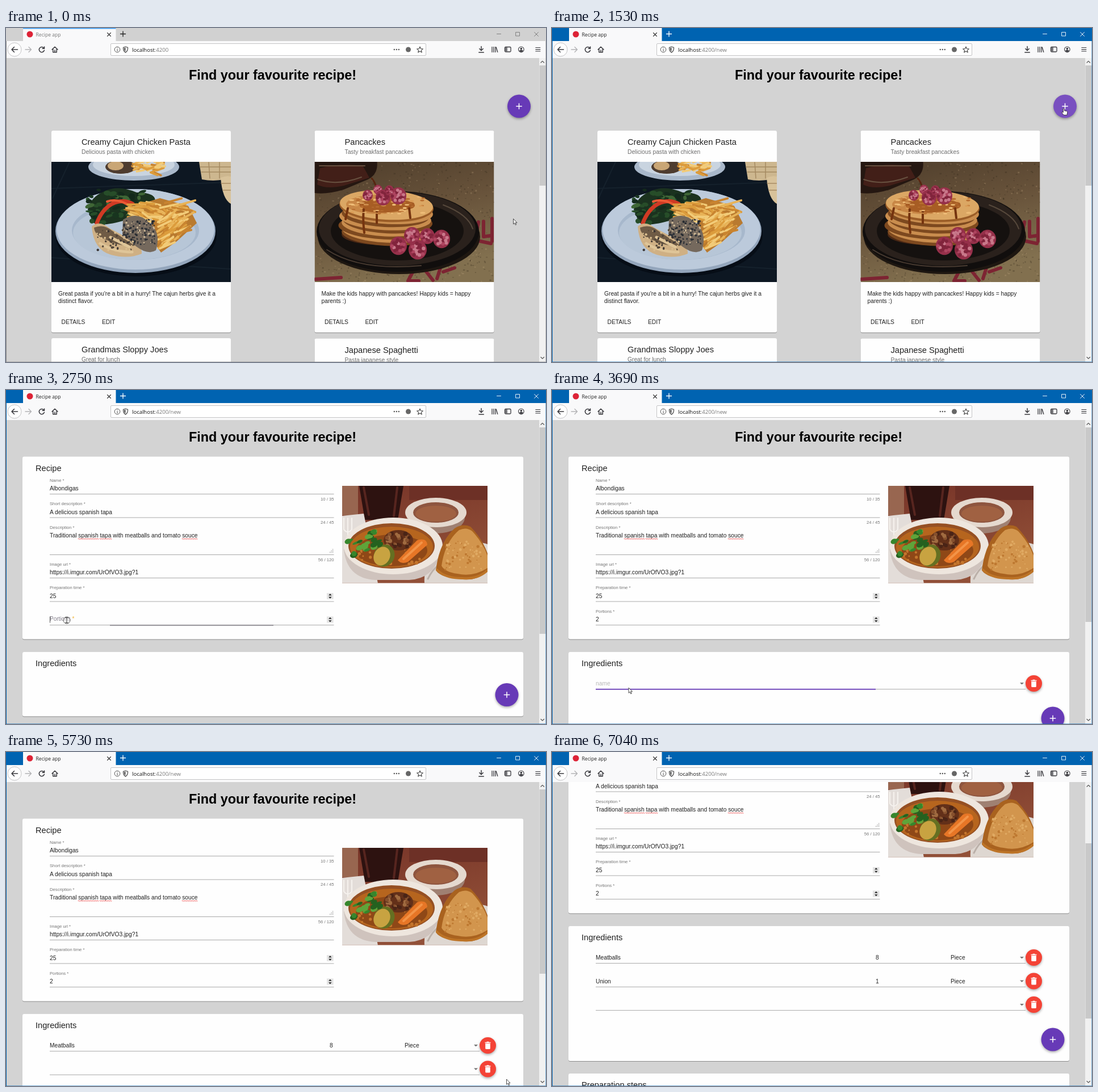
An HTML page that plays this animation: 951 by 589 pixels, repeating every 8 s.

```html
<!DOCTYPE html>
<html lang="en">
<head>
<meta charset="utf-8">
<title>Recipe app</title>
<style>
html, body { margin: 0; width: 100%; height: 100%; overflow: hidden; background: #d3d3d3; }
svg { display: block; width: 951px; height: 589px; font: 10.25px "Liberation Sans", Arial, sans-serif; }
.ui { font-family: "Open Sans", "Noto Sans", sans-serif; }
.card { fill: #fefefe; filter: drop-shadow(0 1px 0.6px #0005); }
.fab { filter: drop-shadow(0 2.5px 2px #0005); }
.menu { fill: #fff; filter: drop-shadow(0 2px 3px #0005); }
.line { fill: none; stroke-linecap: round; stroke-linejoin: round; }
</style>
</head>
<body>
<svg id="stage" viewBox="0 0 951 589"></svg>
<script>
const LOOP = 8000, PURPLE = '#673ab7', INK = '#212121', SOFT = '#757575', AMBER = '#f0b030';

// Each step changes the state left by the one before it.
const STEPS = [
  { at: 0, view: 'home', thumb: [66, 278], cur: ['arrow', 893, 336] },
  { at: 430, cur: ['arrow', 895, 178] },
  { at: 850, cur: ['hand', 897.5, 141] },
  { at: 1530, active: true, path: '/new', hover: true },
  { at: 1930, view: 'form', hover: false, focus: 'url', thumb: [66, 430], cur: ['beam', 89.5, 361.5] },
  { at: 2340, focus: 'prep' },
  { at: 2750, focus: 'portionsStart', prep: '25', photo: true, cur: ['press', 107, 406] },
  { at: 3170, focus: 'portions', portions: '2', cur: ['arrow', 570, 566] },
  { at: 3690, focus: 'name', thumb: [66, 409], rows: [['', '', '']], cur: ['arrow', 134.5, 524.5] },
  { at: 4370, focus: 'qty', rows: [['Meatballs', '8', '']], cur: ['arrow', 694.5, 522] },
  { at: 4790, focus: 'unit', menu: true, cur: ['hand', 722, 516] },
  { at: 5190, focus: '', menu: false, rows: [['Meatballs', '8', 'Piece']], cur: ['hand', 876, 575] },
  { at: 5730, thumb: [66, 391], rows: [['Meatballs', '8', 'Piece'], ['', '', '']], cur: ['arrow', 881, 576.5] },
  { at: 6650, thumb: [161, 470], scroll: 155, hover: true, cur: ['arrow', 882, 534.5],
    rows: [['Meatballs', '8', 'Piece'], ['Union', '1', 'Piece'], ['', '', '']] },
  { at: 7040, hover: false, cur: null }
];
let last = { rows: [], path: '', prep: '', portions: '', scroll: 0 };
const states = STEPS.map(s => last = { ...last, ...s });

// Drawing helpers
const rect = (x, y, w, h, fill, more = '') => `<rect x="${x}" y="${y}" width="${w}" height="${h}" fill="${fill}" ${more}/>`;
const oval = (x, y, rx, ry, fill, more = '') => `<ellipse cx="${x}" cy="${y}" rx="${rx}" ry="${ry}" fill="${fill}" ${more}/>`;
const dot = (x, y, r, fill, more) => oval(x, y, r, r, fill, more);
const shape = (d, fill, more = '') => `<path d="${d}" fill="${fill}" ${more}/>`;
const line = (d, color, w = 1) => `<path class="line" d="${d}" stroke="${color}" stroke-width="${w}"/>`;
const rule = (x1, x2, y, color = '#949494', w = 0.8) => rect(x1, y - w / 2, x2 - x1, w, color);
const text = (x, y, s, size = 10.25, fill = INK, more = '') =>
  `<text x="${x}" y="${y}" font-size="${size}" fill="${fill}" ${more}>${s}</text>`;
const group = (s, attrs) => `<g ${attrs}>${s}</g>`;
const turn = (a, x, y) => `transform="rotate(${a} ${x} ${y})"`;
const many = (n, fn) => Array.from({ length: n }, (_, i) => fn(i)).join('');
function seeded(seed) {
  return (lo, hi) => lo + (hi - lo) * ((seed = seed * 16807 % 2147483647) / 2147483647);
}
const pick = (r, list) => list[Math.floor(r(0, list.length))];

// Photographs as flat shapes
function pastaPhoto() {
  const r = seeded(41);
  const fry = (x, y, len, a) => line(`M${x} ${y}l${len * Math.cos(a)} ${len * Math.sin(a)}`,
    pick(r, ['#e8b358', '#dc9c3c', '#f2cb78', '#c98430']), 3.8);
  return rect(80, 236, 316, 212, '#0d1722')
    + line('M80 283L396 272M80 405L396 425M112 236L82 300', '#15212c', 2)
    + shape('M340 236h56v28q-25 8-51 3Z', '#cdb78f') + line('M342 245h54M344 254h52M357 237l2 28M376 237v28', '#a58a62', 1.5)
    + shape('M378 264q10-4 18-2v48q-15-8-18-46Z', '#d8c29a') + line('M379 274h17M382 286h14', '#a88c64', 1.5)
    + oval(225, 245, 80, 24, '#a9b8ca') + oval(225, 241, 72, 20, '#c9d4e0')
    + oval(202, 245, 27, 12, '#4e3c2f') + oval(193, 243, 14, 8, '#c9a676')
    + many(30, () => fry(r(222, 268), r(236, 255), 13, r(-0.7, 0.5)))
    + oval(229, 366, 142, 72, '#060d16') + oval(228, 358, 141, 74, '#94a6bc')
    + oval(228, 355, 139, 71, '#bccadb') + oval(228, 357, 112, 52, '#a7b8cc') + oval(226, 361, 108, 48, '#b7c6d7')
    + shape('M144 320q5-22 29-32q25-12 57 2q37 0 32 18l-49 30q-46 14-60 5Z', '#1b321f')
    + many(60, () => oval(r(145, 250), r(289, 336), r(3, 8), r(2, 5), pick(r, ['#18351f', '#274d29', '#3f6636', '#142a1c']), turn(r(-20, 20), 200, 315)))
    + line('M160 344q9-24 27-34q19-9 36 0', '#cf3a24', 7) + line('M178 306q18-6 37 6', '#ea5a35', 4)
    + shape('M206 320l65-20l50 14l15 30l-35 32l-28 20l-14-20l-3-34Z', '#b97a2f')
    + many(55, () => { const x = r(208, 302); return fry(x, r(306, 336), r(20, 38), r(-0.3, 0.7)); })
    + many(55, () => { const x = r(266, 304); return fry(x, r(334, 392 - (x - 266) * 0.5), r(18, 32), r(-0.9, -0.2)); })
    + shape('M151 350q13-12 31 3l32 17q26 10 25 28q-24 10-54 2q-31-9-34-50Z', '#cfb084')
    + shape('M206 338q25-16 45 4q23 17 13 50q-14 9-35-7l-24-22Z', '#75695d')
    + shape('M155 352q17-7 31 5l41 27q-24 2-47-9q-24-8-25-23Z', '#6f5b45')
    + line('M166 380q24 15 56 15M184 369l33 17', '#dfc598', 5)
    + many(110, () => dot(r(207, 262), r(338, 382), r(0.7, 2.2), pick(r, ['#272b31', '#30343a', '#c9b594'])))
    + many(55, () => dot(r(157, 224), r(356, 392), r(0.8, 2.2), pick(r, ['#393332', '#54473a', '#d9bd8e'])));
}

function berry(x, y, s, r) {
  return oval(x, y, s, s * 1.08, '#96304a')
    + many(18, i => {
      const a = i * 2.4, d = Math.sqrt(i / 18) * 0.78;
      return dot(x + s * d * Math.cos(a), y + s * d * Math.sin(a), s * 0.2, pick(r, ['#c8788a', '#ae4560', '#81243c']));
    });
}

function pancakePhoto() {
  const r = seeded(77), x0 = 543.5;
  return rect(x0, 236, 316, 212, 'url(#burlap)')
    + many(700, () => {
      const x = r(x0, 860), y = r(236, 448);
      return rect(x, y, r(1, 3.5), r(1, 3), pick(r, ['#2f241850', '#2f241840', '#c5ad8440']));
    })
    + line('M832 342l-3 18M841 341v27l13-2M856 336v40M716 431l-8 15h19M738 427l14 18M765 423l-6 19M770 430l20-7M545 443l45-3M826 374l28 6', '#7d2432', 6)
    + oval(692, 368, 143, 66, '#1e1711') + oval(690, 359, 143, 71, '#110e0d')
    + oval(689, 354, 138, 65, '#2a211c') + oval(689, 358, 117, 52, '#15110f')
    + line('M565 391q58 38 166 28', '#493b31', 2) + line('M770 312q44 17 52 42', '#56483b', 2)
    + oval(666, 364, 75, 19, '#4b2814')
    + many(8, i => oval(669 + Math.sin(i * 2) * 3, 363 - i * 5.5, 77 + i % 3 * 2, 21, i % 2 ? '#c98d4e' : '#7d491f', turn(3, 669, 345)))
    + oval(670, 315, 83, 27, '#9b5d27', turn(3, 670, 315)) + oval(670, 312, 82, 26, '#dba764', turn(3, 670, 312))
    + oval(656, 311, 57, 17, '#c88746') + shape('M620 309q44-16 98-1q7 10-12 12q-51 11-78 1Z', '#a75d24')
    + line('M630 320q-2 18 1 41M653 323v21M602 318l-4 19M710 318l2 17', '#75340f', 4)
    + many(70, () => oval(r(606, 735), r(298, 328), r(2, 5), r(0.7, 1.7), pick(r, ['#efbd78', '#b96f31', '#d99b55'])))
    + shape('M543.5 236h110q2 22-16 31l-43 18q-30 9-51 6Z', '#251711')
    + shape('M553 247q42-10 76-3l11 20l-45 14q-31 7-47-2Z', '#421f18')
    + line('M552 243h80M549 267q34 12 77-4', '#67503f', 2) + line('M644 265q7 8 8 18', '#572611', 3)
    + [[637, 295, 9], [655, 285, 8], [691, 296, 14], [664, 299, 13], [675, 286, 8],
       [691, 384, 15], [715, 366, 14], [725, 391, 16], [742, 367, 13], [767, 372, 15]].map(b => berry(...b, r)).join('');
}

function soupPhoto() {
  const r = seeded(19);
  return rect(592, 169, 256, 172, 'url(#table)')
    + rect(592, 169, 28, 52, '#986650') + rect(710, 169, 138, 25, '#6d3026')
    + shape('M622 169h78l-10 60h-58Z', '#2d1210') + line('M630 172l9 48M689 172l-6 50', '#57251f', 4)
    + shape('M592 222l38-4l25 123h-63Z', '#e3ddd9') + line('M595 226v20q7 9 14 0v-20M602 226v63', '#f6f2ee', 2)
    + shape('M737 341q-3-48 39-64q55-13 72-5v69Z', '#ded7d1') + line('M743 333q23-50 105-44', '#bbb0a9', 3)
    + oval(757, 225, 51, 28, '#9f8072') + oval(757, 216, 54, 26, '#e5d9cf') + oval(757, 216, 40, 18, '#8e553f') + oval(757, 218, 36, 14, '#a06142')
    + shape('M595 281q5 51 55 54h60q50-3 57-60Z', '#cfc3bd')
    + oval(682, 275, 87, 50, '#eee6de') + oval(679, 275, 76, 40, '#965023') + oval(679, 277, 73, 36, '#b6651e') + oval(679, 283, 63, 28, '#8f4817')
    + many(35, () => dot(r(620, 735), r(278, 307), r(1, 3), '#c5762d'))
    + oval(691, 265, 26, 18, '#633019')
    + many(30, () => dot(r(670, 712), r(252, 277), r(2, 4), pick(r, ['#86502d', '#4a2416', '#a06b40'])))
    + shape('M690 300l34-35q17-5 18 8l-34 30q-12 5-18-3Z', '#e77626') + line('M700 298l32-29', '#f39448', 4)
    + oval(666, 292, 18, 20, '#657022', turn(28, 666, 292)) + oval(662, 293, 14, 17, '#c8a341', turn(28, 662, 293))
    + many(28, () => oval(r(605, 658), r(256, 283), r(4, 7), r(2, 5), pick(r, ['#37862c', '#5fa43a', '#25611f']), turn(-22, 631, 270)))
    + shape('M757 318q6-50 33-74q14-9 28-3q20 20 30 47v32q-22 20-55 12q-28-2-36-14Z', '#a9621f')
    + shape('M767 310q6-42 31-63q13-6 23 2q18 19 27 43v22q-25 16-53 10q-22-3-28-14Z', '#d2954d')
    + line('M759 317q14 15 45 15q27 2 44-14', '#bd7427', 4)
    + many(65, () => dot(r(773, 838), r(267, 318), r(0.8, 2.6), pick(r, ['#e0aa63', '#bd7830'])));
}

const PHOTOS = { pasta: pastaPhoto(), pancake: pancakePhoto(), soup: soupPhoto() };
const DEFS = `<defs>
  <clipPath id="page"><rect x="1" y="53" width="938" height="536"/></clipPath>
  <clipPath id="pasta"><rect x="80" y="236" width="316" height="212"/></clipPath>
  <clipPath id="pancake"><rect x="543.5" y="236" width="316" height="212"/></clipPath>
  <clipPath id="soup"><rect x="592" y="169" width="256" height="171.5"/></clipPath>
  <linearGradient id="burlap" x2=".35" y2="1"><stop stop-color="#4e3d2b"/><stop offset=".5" stop-color="#67523a"/><stop offset="1" stop-color="#82704f"/></linearGradient>
  <linearGradient id="table" x2=".4" y2="1"><stop stop-color="#773428"/><stop offset="1" stop-color="#925038"/></linearGradient>
</defs>`;
const photo = id => group(PHOTOS[id], `clip-path="url(#${id})"`);

// Controls
function fab(x, y, hover) {
  return dot(x, y, 20.5, hover ? '#7950c0' : PURPLE, 'class="fab"') + line(`M${x - 4.7} ${y}h9.4M${x} ${y - 4.7}v9.4`, '#fff', 1.5);
}

function bin(x, y) {
  return dot(x, y, 14.5, '#f44336', 'class="fab"')
    + shape(`M${x - 5} ${y - 5.8}h2.5l1-1h3l1 1h2.5v1.5h-10ZM${x - 4.3} ${y - 3.5}h8.6v8.5q0 1.5-1.5 1.5h-5.6q-1.5 0-1.5-1.5Z`, '#fff');
}

function card(x, y, w, h) { return rect(x, y, w, h, '#fefefe', 'rx="3" class="card"'); }

function recipe(x, y, title, sub, id = '', lines = []) {
  return card(x, y, 316, 356) + text(x + 53, y + 25, title, 14.64) + text(x + 53, y + 41, sub, 10.25, '#6e6e6e')
    + (id ? photo(id) : '')
    + lines.map((s, i) => text(x + 12, y + 291.3 + i * 12.5, s)).join('')
    + text(x + 17.5, y + 340.7, 'DETAILS') + text(x + 89, y + 340.7, 'EDIT');
}

function home(s) {
  return recipe(80, 181, 'Creamy Cajun Chicken Pasta', 'Delicious pasta with chicken', 'pasta',
      ["Great pasta if you're a bit in a hurry! The cajun herbs give it a", 'distinct flavor.'])
    + recipe(543.5, 181, 'Pancackes', 'Tasty breakfast pancackes', 'pancake',
      ['Make the kids happy with pancackes! Happy kids = happy', 'parents :)'])
    + recipe(80, 547, 'Grandmas Sloppy Joes', 'Great for lunch')
    + recipe(543.5, 547.7, 'Japanese Spaghetti', 'Pasta japanese style')
    + fab(903.5, 138, s.hover);
}

function field(label, y, value, { focus = false, height = 24.5, hint = '' } = {}) {
  const base = y + 18, under = y + height, open = value || focus;
  const star = focus ? `<tspan fill="${AMBER}">*</tspan>` : '*';
  return (open ? text(77, y + 2.5, `${label} ${star}`, 7.68, focus ? PURPLE : SOFT) : text(77, base, `${label} *`, 10.25, SOFT))
    + text(77, base, value) + rule(77, 577.5, under)
    + (focus ? rule(77, 577.5, under, PURPLE, 1.8) : '')
    + (hint ? text(577.5, under + 11.2, hint, 7.68, SOFT, 'text-anchor="end"') : '');
}

function caret(x, y) { return rect(x, y - 5.5, 0.8, 11, '#333'); }

function spinner(y) {
  return rect(565, y - 5.5, 11.5, 11, '#e4e4e4') + shape(`M568 ${y - 1.2}l2.8-3 2.8 3ZM568 ${y + 1.2}l2.8 3 2.8-3Z`, '#222');
}

function squiggle(x1, x2) {
  const n = Math.round((x2 - x1) / 3);
  return line(`M${x1} 262.5` + 'q.75-1.8 1.5 0t1.5 0'.repeat(n), '#e33', 0.8);
}

function portionsField(s) {
  if (s.focus !== 'portionsStart') return field('Portions', 390, s.portions, { focus: s.focus === 'portions' });
  return text(77, 407, `Portions <tspan fill="${AMBER}">*</tspan>`, 10, '#85808c')
    + rule(77, 577.5, 414.5) + rule(183, 471, 414.8, '#8a878e', 1.8) + caret(77, 405);
}

function ingredient(row, i, focus) {
  const y = 517.5 + i * 41.5, base = y + 3.6, under = y + 10.2;
  const span = { name: [77, 570], qty: [570, 702], unit: [702, 834] }[i ? '' : focus];
  return rule(77, 834, under) + (span ? rule(...span, under, PURPLE, 1.8) : '')
    + (focus === 'name' ? text(77, base, 'name', 10.25, '#b8b8b8') : '')
    + [77, 570, 702].map((x, k) => text(x, base, row[k])).join('')
    + shape(`M824 ${y - 1.5}h7l-3.5 3.5Z`, SOFT) + bin(848.5, y);
}

function unitMenu() {
  return rect(688, 331, 162, 203, '#fff', 'rx="3" class="menu"') + rect(688, 494, 162, 40, '#eee')
    + ['Gram', 'Kilogram', 'Liter', 'Spoon', 'Piece'].map((s, i) => text(702, 355 + i * 40.6, s)).join('');
}

function form(s) {
  const grow = s.rows.length * 41.5;
  return card(29, 117.5, 882, 322) + text(52, 143, 'Recipe', 14.64)
    + field('Name', 159, 'Albondigas', { hint: '10 / 35' })
    + field('Short description', 200.5, 'A delicious spanish tapa', { hint: '24 / 45' })
    + field('Description', 242, 'Traditional spanish tapa with meatballs and tomato souce', { height: 48.5, hint: '56 / 120' })
    + squiggle(127, 162) + squiggle(165, 185) + squiggle(310, 337)
    + many(3, i => many(i + 1, k => rect(570 + i * 2.5, 285.5 - k * 2.5, 1.2, 1.2, '#888')))
    + field('Image url', 307, 'https://i.imgur.com/UrOfVO3.jpg?1', { focus: s.focus === 'url' })
    + (s.focus === 'url' ? caret(232.5, 321.5) : '')
    + field('Preparation time', 348.5, s.prep, { focus: s.focus === 'prep' })
    + (s.focus === 'prep' ? caret(77, 363.5) : '')
    + portionsField(s) + (s.focus === 'portions' ? caret(83, 405) : '')
    + spinner(363.5) + spinner(405)
    + (s.photo ? photo('soup') : rect(592, 169.5, 256, 183, '#cbcbcb')
      + group(text(0, 0, 'Add an image', 17.4, '#969696', 'text-anchor="middle"'), 'transform="translate(717.5 272) scale(1 1.18)"'))
    + card(29, 462, 882, 113.5 + grow) + text(52, 487, 'Ingredients', 14.64)
    + s.rows.map((row, i) => ingredient(row, i, s.focus)).join('')
    + fab(882, 537.5 + grow, s.hover)
    + card(29, 597.5 + grow, 882, 120) + text(52, 622.5 + grow, 'Preparation steps', 14.64)
    + (s.menu ? unitMenu() : '');
}

// Browser window
function windowFrame(s) {
  const bar = s.active ? '#0063b1' : '#d1d1d1', ink = s.active ? '#fff' : '#777', icon = '#38383d';
  return rect(0, 0, 951, 23, bar) + rect(30, 0, 163.5, 23, '#f9f9fa')
    + (s.active ? '' : rect(30, 0, 163.5, 1.5, '#3b9cf5'))
    + dot(42, 11, 5.5, '#dd2336')
    + text(52.5, 14.7, 'Recipe app', 8.6, s.active ? '#222' : '#777', 'class="ui"')
    + line('M178.5 8.5l6 6m0-6l-6 6', '#333', 1.1)
    + line('M201.5 10.5h9M206 6v9', s.active ? '#fff' : '#222', 1.3)
    + line('M864.5 10.5h7M898 7.5h6.5v6.5h-6.5ZM930.5 7.5l7 7m0-7l-7 7', ink, 0.9)
    + rect(0, 23, 951, 30, '#f9f9fa') + rect(184.5, 27.5, 555, 21, '#fff', 'stroke="#c4c4c6" rx="1.5"')
    + dot(15, 38, 12, '#fff', 'stroke="#bcbcbe" stroke-width=".9"')
    + line('M20.5 38h-10.5m4.5-4.5l-4.5 4.5 4.5 4.5', icon, 1.5)
    + line('M34 38h10.5m-4.5-4.5l4.5 4.5-4.5 4.5', '#b3b3b5', 1.4)
    + line('M66.8 35.5a4.6 4.6 0 1 0 .6 3.8M67.5 33v3.3h-3.5', icon, 1.5)
    + line('M81 38l5-4.8 5 4.8M82.8 37.5v5.2h6.4v-5.2M86 42v-3', icon, 1.5)
    + dot(196, 38, 4.8, 'none', 'stroke="#555" stroke-width="1"') + line('M196 37.5v3M196 35.5v.1', '#555', 1.1)
    + line('M210.5 33l4 1.3q.5 6-4 9q-4.5-3-4-9Z', '#555', 1.3) + shape('M210.5 34.5v7q-3-2.5-2.8-6Z', '#555')
    + text(222, 41.8, `localhost<tspan fill="#777">:4200${s.path}</tspan>`, 9.5, '#111', 'class="ui"')
    + many(3, i => dot(683.8 + i * 4, 38, 1.2, '#555')) + dot(708.5, 38, 4.5, '#666')
    + line('M729 33l1.5 3.5 3.8.3-2.9 2.5.9 3.7-3.3-2-3.3 2 .9-3.7-2.9-2.5 3.8-.3Z', '#444', 1.1)
    + line('M837 32.5v7m-3.2-3l3.2 3.2 3.2-3.2M832.8 43h8.5', icon, 1.5)
    + line('M856 33.5v9M859 33.5v9M862 33.5v9M863.2 34l2.6 8.5', icon, 1.3)
    + rect(878.5, 33.5, 10.5, 8.5, 'none', `rx="1.5" stroke="${icon}" stroke-width="1.3"`) + rect(879, 34, 4, 7.5, '#77777b')
    + dot(907.3, 37.8, 4.8, 'none', `stroke="${icon}" stroke-width="1.1"`) + dot(907.3, 36.5, 1.8, icon) + oval(907.3, 40.2, 3, 1.6, icon)
    + line('M932.8 34.5h8M932.8 37.8h8M932.8 41h8', icon, 1.2);
}

function scrollbar([top, end]) {
  return rect(939, 53, 12, 536, '#f1f1f1') + rect(939.5, top, 11, end - top, '#c9c9c9')
    + line('M942 61l2.7-2.7 2.7 2.7M942 580.5l2.7 2.7 2.7-2.7', '#555', 1.2);
}

// The left edge is solid, the right and bottom edges fall between pixels.
function windowEdge(active) {
  const color = active ? '#0063b1' : '#888';
  return rect(0, 23, 1, 566, color) + rect(950.5, 23, 0.5, 566, color) + rect(1, 588.5, 949.5, 0.5, color);
}

function pointer(kind, x, y) {
  const beam = line('M0 0h2q.5 0 .5 1q0-1 .5-1h2M2.5 1v7.5M0 9.5h2q.5 0 .5-1q0 1 .5 1h2', '#222', 0.9);
  const art = {
    arrow: () => shape('M.5 .5V9.8L2.7 7.8 4.2 11.3 5.7 10.7 4.2 7.3H7Z', '#fff', 'stroke="#222" stroke-width=".8"'),
    hand: () => shape('M2.8 1.2q1-1.2 2 0v3.6l4.4.9q1.2.5 1 1.8l-.8 5h-5.6L.5 8.5q-.3-1.5 1-1.5l1.3 1Z', '#fff', 'stroke="#222" stroke-width=".8"'),
    beam: () => beam,
    press: () => dot(0, 0, 6, '#ffffff55', 'stroke="#555" stroke-width=".9"') + group(beam, 'transform="translate(-2.5 -4.8)"')
  };
  return group(art[kind](), `transform="translate(${x} ${y})"`);
}

function draw(s) {
  const heading = text(469.5, 90.5, 'Find your favourite recipe!', 23.42, '#000', 'font-weight="700" text-anchor="middle"');
  const page = group(heading + (s.view === 'home' ? home(s) : form(s)), `transform="translate(0 ${-s.scroll})"`);
  return DEFS + rect(0, 0, 951, 589, '#d3d3d3') + group(page, 'clip-path="url(#page)"')
    + windowFrame(s) + scrollbar(s.thumb) + windowEdge(s.active)
    + (s.cur ? pointer(...s.cur) : '');
}

const stage = document.getElementById('stage');
let shown;
function tick() {
  const now = performance.now() % LOOP;
  const state = states.filter(s => s.at <= now).pop();
  if (state !== shown) stage.innerHTML = draw(shown = state);
  requestAnimationFrame(tick);
}
tick();
</script>
</body>
</html>
```
